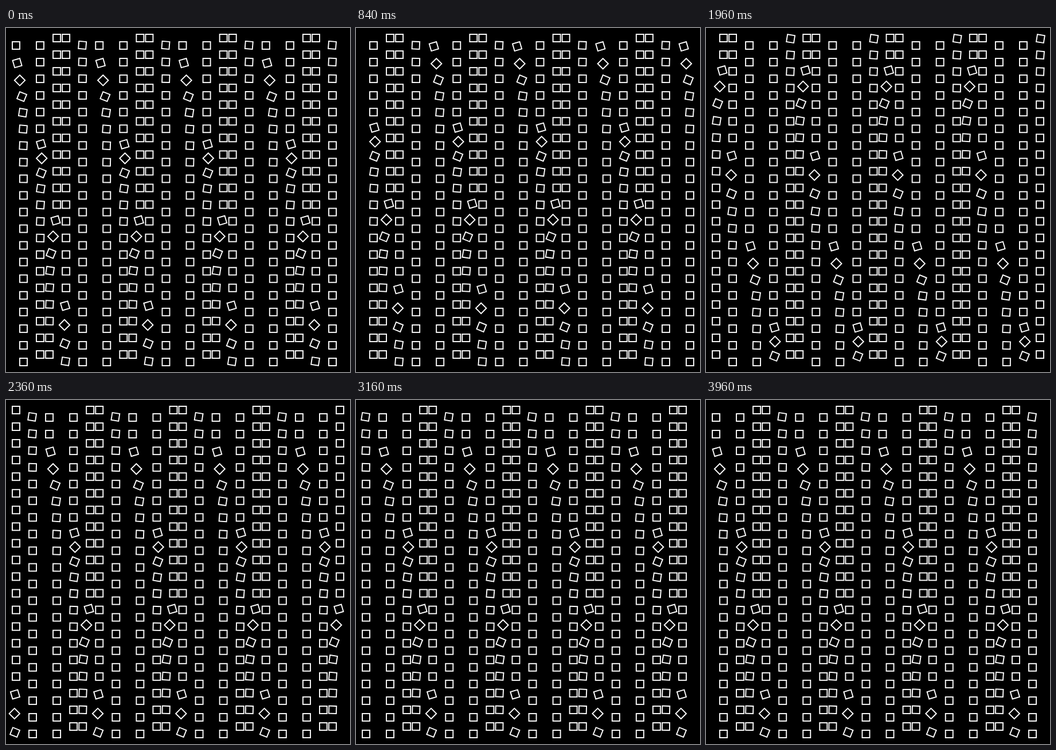
Write an HTML page with a canvas that moves like this. It is 600 px wide and 600 px high and loops after 4000 ms.

```html
<!DOCTYPE html>
<html lang="en">
<head>
<meta charset="utf-8">
<title>Turning squares</title>
<style>
  html, body { margin: 0; width: 100%; height: 100%; overflow: hidden; background: #000; }
  canvas { display: block; width: 600px; height: 600px; }
</style>
</head>
<body>
<canvas id="stage" width="600" height="600"></canvas>
<script>
const ctx = document.getElementById("stage").getContext("2d");
const SIZE = 600, COUNT = 20, MARGIN = 24, SIDE = 13;
const GAP = (SIZE - 2 * MARGIN) / (COUNT - 1);
const TICK = 40, CYCLE = 100, QUARTER = CYCLE / 4;

// Degrees reached after each tick of a quarter turn: quick swing, long settle.
const SWING = [0, 16.3, 45, 68, 81, 85.4, 87.3, 88.4, 89.5];

function turn(tick) {
  const quarter = Math.floor(tick / QUARTER);
  const swing = SWING[tick % QUARTER] ?? 90;
  return -(quarter * 90 + swing) * Math.PI / 180;
}

function drawSquare(x, y, angle) {
  // Each square pivots on its own corner.
  ctx.save();
  ctx.translate(x, y);
  ctx.rotate(angle);
  ctx.strokeRect(-SIDE, 0, SIDE, SIDE);
  ctx.restore();
}

function draw(ms) {
  const now = Math.floor(ms / TICK) % CYCLE;
  ctx.fillStyle = "#000";
  ctx.fillRect(0, 0, SIZE, SIZE);
  ctx.strokeStyle = "#fff";
  ctx.lineWidth = 1.9;
  for (let col = 0; col < COUNT; col++) {
    for (let row = 0; row < COUNT; row++) {
      const tick = (now + col * COUNT + row) % CYCLE;
      drawSquare(MARGIN + col * GAP, MARGIN + row * GAP, turn(tick));
    }
  }
}

const start = performance.now();
function loop() {
  draw(performance.now() - start);
  requestAnimationFrame(loop);
}
loop();
</script>
</body>
</html>
```
